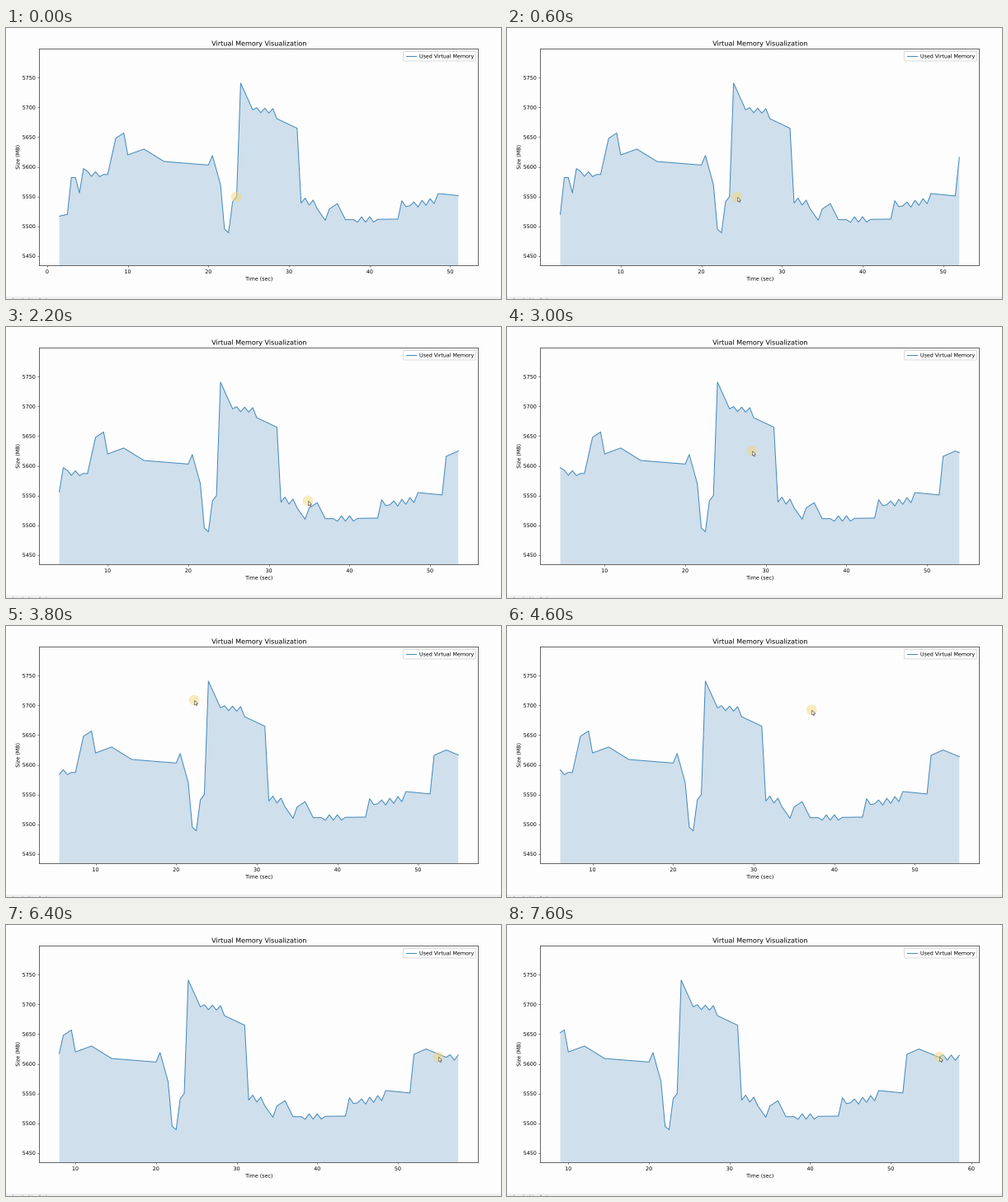
Animation of 600 by 329 pixels, one loop 8000 ms. Source, as a matplotlib script:

```python
import numpy as np
import matplotlib
import matplotlib.pyplot as plt
from matplotlib.animation import FuncAnimation
from matplotlib.patches import (Circle, FancyBboxPatch, PathPatch, Polygon,
                                Rectangle)
from matplotlib.textpath import TextPath
from matplotlib.ticker import MultipleLocator
from matplotlib.transforms import Affine2D

matplotlib.rcParams["font.family"] = "DejaVu Sans"

WIDTH, HEIGHT, DPI = 600, 329, 100
INTERVAL, FRAMES = 200, 40
PX = 72 / DPI  # one pixel in points
LEFT, RIGHT, TOP, BOTTOM = 40.4, 572.4, 25.4, 288.4
LOW, HIGH = 5433.8, 5798.5
WINDOW, STEP, START = 100, 0.5, 1.5
SHIFT_EVERY, SHIFT_OFFSET = 530, 520
PAPER, BLUE, SHADE = "#fdfdfe", "#4489bb", "#cfdfec"

# Turning points of the memory curve: seconds, MB
turns = np.array([
    (1.5, 5517), (2.5, 5520), (3, 5582), (3.5, 5582), (4, 5556), (4.5, 5597),
    (5.5, 5588), (7.5, 5587), (8.5, 5648), (9.5, 5657), (10, 5620),
    (12, 5630), (14.5, 5609), (20, 5603), (20.5, 5619), (21.5, 5570),
    (22, 5495), (22.5, 5489), (23, 5541), (23.5, 5550), (24, 5741),
    (25.5, 5696), (28, 5694), (28.5, 5681), (31, 5665), (31.5, 5544),
    (33, 5539), (34.5, 5510), (35, 5529), (36, 5538), (37, 5511),
    (43.5, 5512), (44, 5543), (44.5, 5533), (48, 5543), (48.5, 5555),
    (51.5, 5551), (52, 5616), (53.5, 5625), (56, 5611), (58.5, 5610)])
# Stretches where the curve jitters once a second: from, to, height
ripples = [(5.5, 6.5, 4), (26, 28, 4), (31.5, 33, 5),
           (38.5, 40.5, 4.5), (45.5, 48, -5), (56.5, 58.5, -4.5)]

# Pointer path: time in ms, x, y in pixels
path = np.array([
    (0, 279, 205), (800, 279, 205), (1200, 337, 240), (2200, 366, 211),
    (3800, 228, 90), (4200, 246, 70), (5200, 554, 150), (5600, 524, 160)])
ARROW = np.array([(0, 0), (0, 5.6), (1.3, 4.5), (2.2, 6.4), (3.1, 6),
                  (2.3, 4.1), (4, 4)])

seconds = np.arange(START, turns[-1, 0] + STEP, STEP)
memory = np.interp(seconds, *turns.T)
for begin, end, height in ripples:
    inside = (seconds >= begin) & (seconds <= end)
    memory += inside * height * np.cos(2 * np.pi * seconds)

fig = plt.figure(figsize=(WIDTH / DPI, HEIGHT / DPI), dpi=DPI, facecolor=PAPER)
ax = fig.add_axes([LEFT / WIDTH, 1 - BOTTOM / HEIGHT,
                   (RIGHT - LEFT) / WIDTH, (BOTTOM - TOP) / HEIGHT])
ax.set_facecolor(PAPER)
ax.set_ylim(LOW, HIGH)
ax.xaxis.set_major_locator(MultipleLocator(10))
ax.yaxis.set_major_locator(MultipleLocator(50))
ax.tick_params(length=2.2 * PX, width=0.7 * PX, color="#444444",
               labelleft=False, labelbottom=False)
for spine in ax.spines.values():
    spine.set(linewidth=0.9 * PX, color="#555555")
line, = ax.plot([], [], color=BLUE, lw=PX, zorder=2)
area = ax.add_patch(Polygon([(0, 0), (1, 0), (1, 1)], fc=SHADE, lw=0, zorder=1))

# Overlay measured in pixels, y pointing down
stage = fig.add_axes([0, 0, 1, 1])
stage.set(xlim=(0, WIDTH), ylim=(HEIGHT, 0))
stage.axis("off")


def place(text, x, y, anchor=0.5, angle=0):
    """Put a text outline at a fractional pixel; anchor 0 is its left edge."""
    box = text.get_path().get_extents()
    move = Affine2D().translate(-box.x0 - anchor * box.width, 0).scale(1, -1)
    text.set_transform(move.rotate_deg(angle).translate(x, y) + stage.transData)


def label(string, x, y, size=6.33, color="black", **placing):
    text = stage.add_patch(PathPatch(TextPath((0, 0), string, size=size),
                                     fc=color, lw=0, snap=False))
    place(text, x, y, **placing)
    return text


label("Virtual Memory Visualization", 306.5, 21.5, size=8.06)
label("Time (sec)", 306.5, 306.6)
label("Size (MB)", 16.3, 157, angle=-90)
for mb in range(5450, 5751, 50):
    y = BOTTOM - (mb - LOW) / (HIGH - LOW) * (BOTTOM - TOP)
    label(str(mb), 35.4, y + 2.3, anchor=1)
time_labels = {s: label(str(s), 0, 0) for s in range(0, 61, 10)}

stage.add_patch(FancyBboxPatch((482.6, 29.4), 86, 9.6,
                               boxstyle="round,pad=1,rounding_size=1.3",
                               fc=PAPER, ec="#cfcfcf", lw=0.7 * PX, zorder=0.5))
stage.plot([484.5, 497], [34.3, 34.3], color=BLUE, lw=PX)
label("Used Virtual Memory", 501.5, 36.4, anchor=0)

stage.add_patch(Rectangle((0, 326), WIDTH, 3, fc="#eeefef", lw=0, zorder=0.5))
label("loaded in 4 steps", 8, 332.5, color="#777777", anchor=0)

halo = stage.add_patch(Circle((0, 0), 6.3, fc="#f6d878", alpha=0.5, lw=0, zorder=5))
arrow = stage.add_patch(Polygon(ARROW, fc="white", ec="#4a4a4a",
                                lw=0.6 * PX, zorder=6))


def update(frame):
    now = frame * INTERVAL
    first = (now + SHIFT_OFFSET) // SHIFT_EVERY
    t = seconds[first:first + WINDOW]
    size = memory[first:first + WINDOW]
    line.set_data(t, size)
    area.set_xy(np.column_stack([np.r_[t[0], t, t[-1]], np.r_[5000, size, 5000]]))
    margin = 0.05 * (t[-1] - t[0])
    start, end = t[0] - margin, t[-1] + margin
    ax.set_xlim(start, end)
    for second, text in time_labels.items():
        text.set_visible(start <= second <= end)
        place(text, np.interp(second, [start, end], [LEFT, RIGHT]), 298)

    x, y = (np.interp(now, path[:, 0], path[:, i]) for i in (1, 2))
    halo.center = x, y
    arrow.set_xy(ARROW + (x + 0.5, y + 0.3))
    arrow.set_visible(now >= 400)
    return line, area, halo, arrow


animation = FuncAnimation(fig, update, frames=FRAMES, interval=INTERVAL,
                          init_func=lambda: update(0), repeat=True,
                          repeat_delay=0, blit=False)
plt.show()
```
